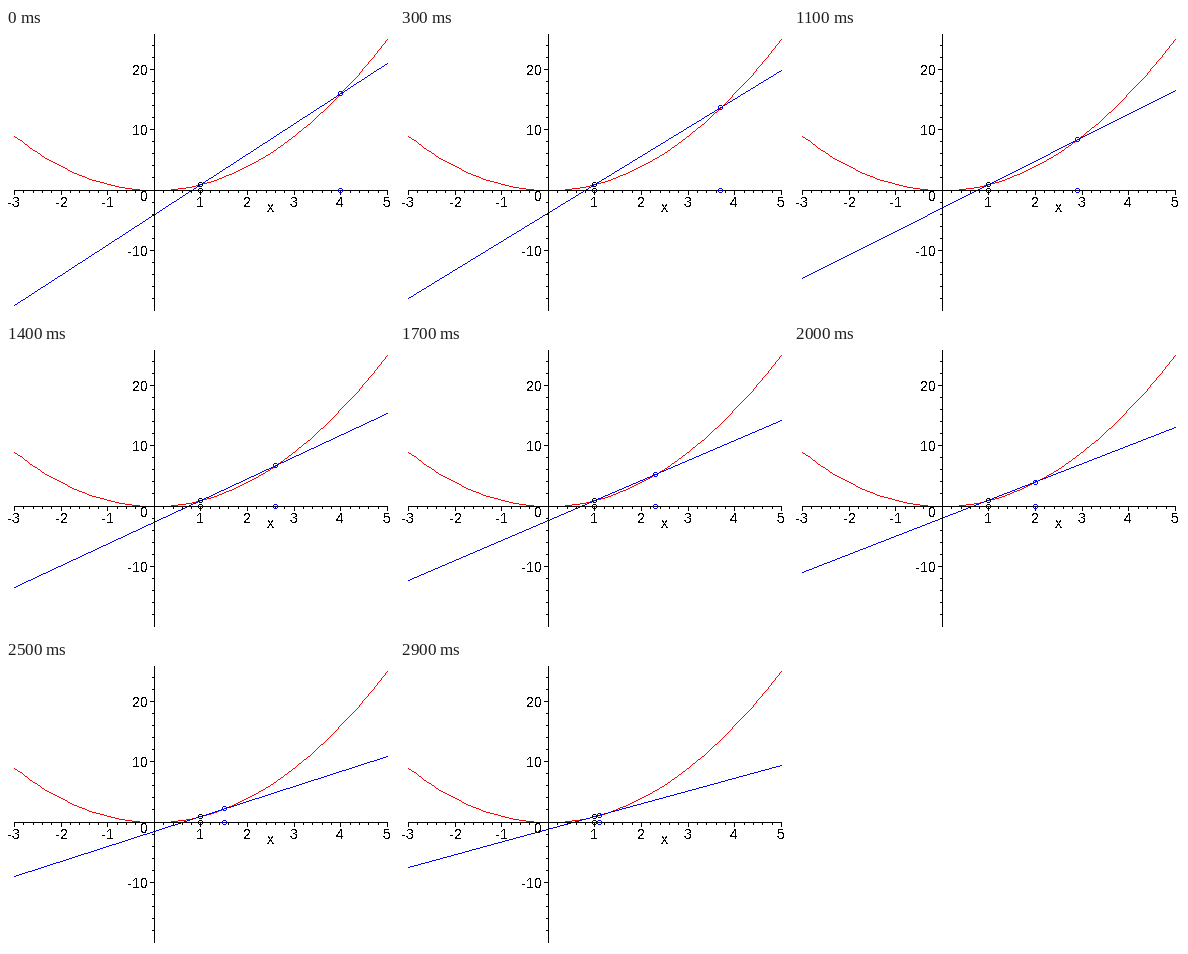
A matplotlib script for the animation above (3000 ms loop, 388 by 288 pixels).

```python
import numpy as np
import matplotlib.pyplot as plt
from matplotlib.animation import FuncAnimation

W, H, DPI = 388, 288, 64
PX = 72 / DPI  # points per pixel
FRAMES, INTERVAL = 30, 100
BLACK, RED, BLUE = "#000000", "#ff0000", "#0000ff"
COL0, ROW0 = 148, 162  # pixel position of the axes

plt.rcParams.update({
    "font.family": "Liberation Sans",
    "font.size": 14 * PX,
    "text.antialiased": False,
    "text.hinting": "force_autohint",
    "text.hinting_factor": 1,
    "path.simplify": False,
})


def col(x):
    return 8 + 46.625 * (np.asarray(x) + 3)


def row(y):
    return 162 - 6.04 * np.asarray(y)


fig = plt.figure(figsize=(W / DPI, H / DPI), dpi=DPI, facecolor="white")
ax = fig.add_axes([0, 0, 1, 1])
ax.set_xlim(0, W)
ax.set_ylim(H, 0)
ax.axis("off")


def pixel_path(cols, rows):
    """One-pixel dashes along a polyline, stepped like a raster line."""
    pts = np.rint(np.column_stack([cols, rows]))
    cells = [pts[:1]]
    for a, b in zip(pts[:-1], pts[1:]):
        n = int(np.abs(b - a).max())
        if n:
            t = np.arange(1, n + 1)[:, None] / n
            cells.append(np.floor(a + (b - a) * t + 0.5))
    x, y = np.vstack(cells).T
    gap = np.full_like(x, np.nan)
    return (np.column_stack([x, x + 1, gap]).ravel(),
            np.column_stack([y + 0.5, y + 0.5, gap]).ravel())


def stroke(cols, rows, color=BLACK, z=3):
    return ax.plot(*pixel_path(cols, rows), color=color, lw=PX, zorder=z,
                   solid_capstyle="butt", snap=False)[0]


def label(x, y, text, ha="center"):
    ax.text(x, y, text, ha=ha, va="baseline", color=BLACK, zorder=5)


# Small ring five pixels wide
RING = np.array([(-1, -2), (1, -2), (2, -1), (2, 1), (1, 2),
                 (-1, 2), (-2, 1), (-2, -1), (-1, -2)])


def ring_at(x, y):
    return (RING + np.rint([col(x), row(y)])).T


def draw_axes():
    stroke([8, 381], [ROW0, ROW0])
    stroke([COL0, COL0], [6, 282])
    for i in range(-15, 26):
        c = np.rint(col(i / 5))
        major = i % 5 == 0
        stroke([c, c], [ROW0, ROW0 + (4 if major else 2)])
        if major and i:
            label(c, 179, str(i // 5))
    for y in range(-18, 25, 2):
        r = np.floor(row(y))
        major = y % 10 == 0
        stroke([COL0 - (4 if major else 2), COL0], [r, r])
        if major and y:
            label(142, r + 6, str(y), "right")
    label(142, 173, "0", "right")
    label(264.5, 184, "x")


xs = np.linspace(-3, 5, 50)
stroke(col(xs), row(xs ** 2), RED, 1)
draw_axes()
for y in (0, 1):
    stroke(*ring_at(1, y), BLACK, 4)

secant = stroke([0], [0], BLUE, 2)
foot = stroke([0], [0], BLUE, 4)
point = stroke([0], [0], BLUE, 4)


def update(i):
    b = 4 - 0.1 * i
    ends = np.array([-3, 5])
    secant.set_data(*pixel_path(col(ends), row(1 + (1 + b) * (ends - 1))))
    foot.set_data(*pixel_path(*ring_at(b, 0)))
    point.set_data(*pixel_path(*ring_at(b, b * b)))
    return secant, foot, point


anim = FuncAnimation(fig, update, frames=FRAMES, interval=INTERVAL,
                     repeat=True, repeat_delay=0)
plt.show()
```
